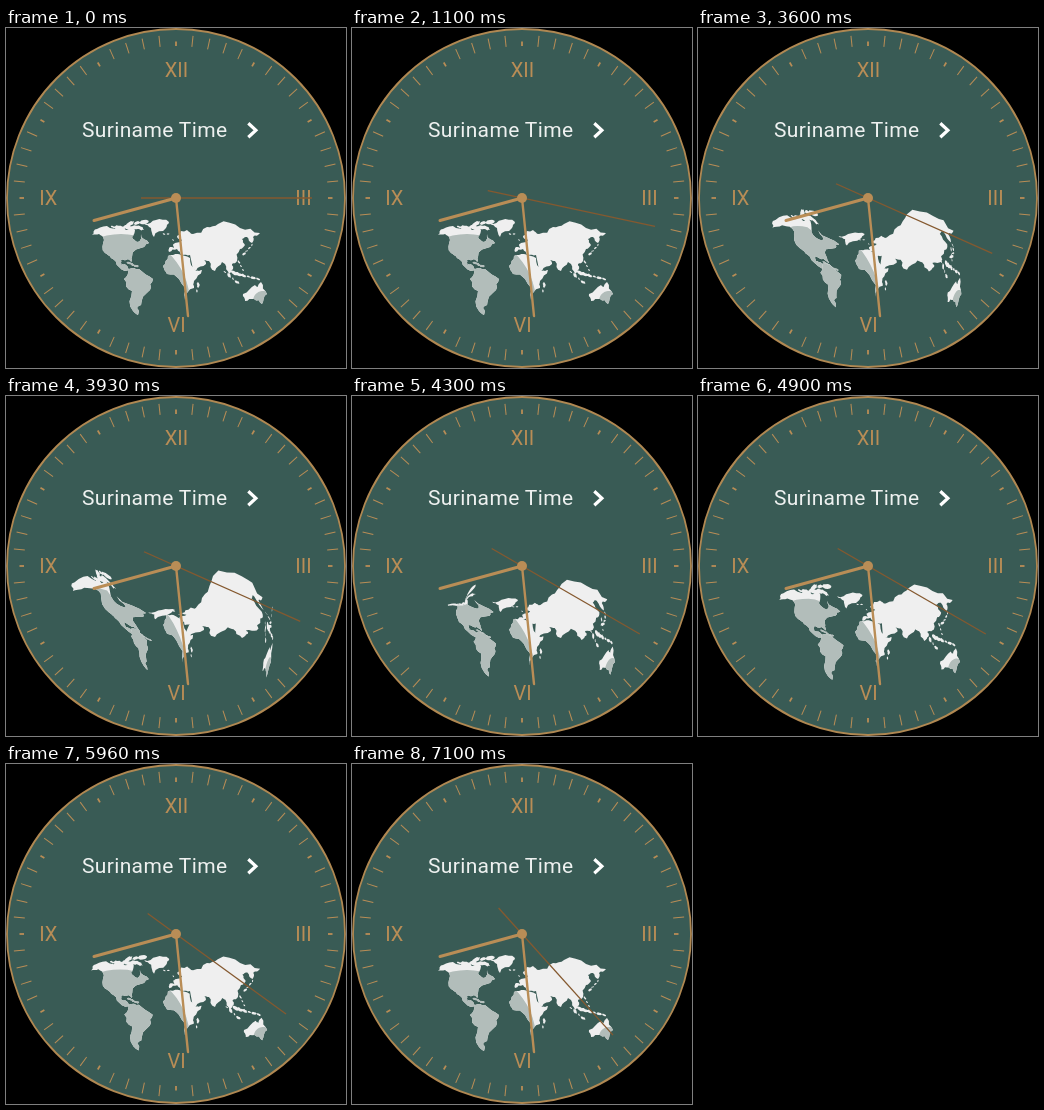
Recreate the animation shown at these times as an HTML page. Size 340 by 340 pixels, loop 8000 ms.

```html
<!DOCTYPE html>
<html lang="en">
<head>
<meta charset="utf-8">
<title>World clock</title>
<style>
html, body { margin: 0; width: 100%; height: 100%; overflow: hidden; background: #000; }
svg { display: block; width: 100vw; height: 100vh; font-family: Roboto, sans-serif; }
</style>
</head>
<body>
<svg viewBox="0 0 340 340">
  <circle cx="170" cy="170" r="169" fill="#395b55" stroke="#b08852" stroke-width="1.8"/>
  <g id="ticks" stroke="#b98d56"></g>
  <g fill="#b98d56" font-size="20" text-anchor="middle">
    <text x="170.5" y="48.5">XII</text>
    <text x="297.5" y="176.5">III</text>
    <text x="42.3" y="176.5">IX</text>
  </g>
  <text x="76" y="109.4" font-size="21" letter-spacing=".35" fill="#eef1f0">Suriname Time</text>
  <path d="M242.3 95.2l7.6 7-7.6 7" fill="none" stroke="#fff" stroke-width="3.2"/>
  <g id="map"></g>
  <text x="170.5" y="303.5" font-size="20" text-anchor="middle" fill="#b98d56">VI</text>
  <path id="second" d="M135 170H306" stroke="#85592f" stroke-width="1.3"/>
  <g stroke="#b98d56" stroke-linecap="round">
    <path d="M170 170L88 192.5" stroke-width="3"/>
    <path d="M170 170L182 288" stroke-width="2.4"/>
  </g>
  <circle cx="170" cy="170" r="5" fill="#b98d56"/>
</svg>
<script>
const $ = id => document.getElementById(id);
const points = s => s.trim().split(/\s+/).map(p => p.split(',').map(Number));
const clamp = v => Math.min(1, Math.max(0, v));
const smooth = v => (v = clamp(v)) * v * (3 - 2 * v);
const mix = (a, b, k) => a + (b - a) * k;

let seed = 7;
const random = () => (seed = seed * 16807 % 2147483647) / 2147483647;

// Roughen an outline by pushing the midpoint of every edge sideways
function coast(pts, depth = 2) {
  if (!depth) return pts;
  return coast(pts.flatMap(([x, y], i) => {
    const [u, v] = pts[(i + 1) % pts.length], r = (random() - .5) * .4;
    return [[x, y], [(x + u) / 2 + (v - y) * r, (y + v) / 2 - (u - x) * r]];
  }), depth - 1);
}

// A row of small islands from one point to another
function islands(x, y, u, v, count, size) {
  const angle = Math.atan2(v - y, u - x);
  return Array.from({ length: count }, (_, i) => {
    const k = i / (count - 1), s = size * (.6 + random() * .7), turn = angle + random() - .5;
    return coast([0, 1, 2, 3, 4, 5].map(n => {
      const a = n * Math.PI / 3, dx = Math.cos(a) * s, dy = Math.sin(a) * s * .45;
      return [mix(x, u, k) + dx * Math.cos(turn) - dy * Math.sin(turn),
              mix(y, v, k) + dx * Math.sin(turn) + dy * Math.cos(turn)];
    }), 1);
  });
}

const circle = (x, y, r) => Array.from({ length: 60 }, (_, i) =>
  [x + r * Math.cos(i * Math.PI / 30), y + r * Math.sin(i * Math.PI / 30)]);
const night = [circle(115, 275, 69), circle(257, 273, 10)];

// Each land: outline, islands, anchors on the world map and on the camel
const lands = [
  { // North America: head and neck
    shape: `86,207 91,201 104,200 120,202 129,202 126,209 132,214 135,206 143,215 138,219 126,229
      125,234 122,231 115,232 115,237 120,237 126,243 113,239 105,230 99,225 98,212 93,206`,
    isles: [[107, 199, 134, 200, 6, 4], [124, 196, 138, 194, 3, 4], [123, 235, 130, 238, 3, 2]],
    from: '86,207 104,200 128,203 97,211 131,208 99,222 143,215 113,238 126,230',
    to: '67,195 86,183 102,189 93,196 107,203 101,213 140,217 118,231 132,232'
  },
  { // South America: front leg
    shape: '123,241 133,241 147,251 144,262 136,272 131,280 132,287 127,283 126,263 118,251',
    from: '119,248 147,252 131,287', to: '125,238 141,245 141,274'
  },
  { // Greenland: back
    shape: '138,195 150,192 163,194 160,200 148,209 145,200',
    from: '138,196 162,194 149,207', to: '142,217 168,214 151,222'
  },
  { // Europe and Asia: hump
    shape: `163,224 163,220 168,220 167,217 176,212 171,208 181,202 187,206 201,199 212,196 234,200
      254,205 247,209 246,215 241,209 236,211 239,217 234,221 231,233 226,236 227,241 223,246 219,236
      216,234 209,243 203,233 198,232 200,236 190,243 184,227 176,227 171,221`,
    isles: [[167, 212, 168, 217, 2, 2], [238, 226, 246, 217, 4, 2.2], [158, 206, 162, 206, 2, 1.5]],
    from: '163,222 180,202 201,199 212,196 236,200 254,206 236,225 223,246 209,243 190,242',
    to: '170,226 184,212 199,198 207,180 238,180 257,203 260,229 236,242 209,241 183,240'
  },
  { // Africa: second leg
    shape: '162,228 172,226 184,230 190,243 196,242 188,253 188,260 179,272 173,251 161,246 157,238',
    isles: [[192, 257, 191, 263, 2, 2.5]],
    from: '158,238 179,271 196,241', to: '158,229 177,266 187,238'
  },
  { // Australia: hind leg
    shape: '237,266 249,257 252,259 255,254 261,266 256,276 248,271 239,273',
    isles: [[219, 244, 231, 254, 4, 2.5], [228, 245, 252, 251, 6, 3], [233, 234, 237, 242, 3, 2]],
    from: '238,270 255,256 257,275', to: '257,270 266,250 261,280'
  }
];

// Moving least squares: local affine map that carries the anchors across
function warp([x, y], from, to) {
  const w = from.map(([a, b]) => ((a - x) ** 2 + (b - y) ** 2 + .5) ** -1.5);
  const total = w.reduce((a, b) => a + b);
  const mean = (set, k) => set.reduce((s, p, i) => s + w[i] * p[k], 0) / total;
  const px = mean(from, 0), py = mean(from, 1), qx = mean(to, 0), qy = mean(to, 1);
  let xx = 0, xy = 0, yy = 0, xu = 0, yu = 0, xv = 0, yv = 0;
  from.forEach((p, i) => {
    const a = p[0] - px, b = p[1] - py, u = to[i][0] - qx, v = to[i][1] - qy, k = w[i];
    xx += k * a * a; xy += k * a * b; yy += k * b * b;
    xu += k * a * u; yu += k * b * u; xv += k * a * v; yv += k * b * v;
  });
  const det = xx * yy - xy * xy, dx = x - px, dy = y - py;
  const g = (dx * yy - dy * xy) / det, h = (dy * xx - dx * xy) / det;
  return [qx + g * xu + h * yu, qy + g * xv + h * yv];
}

lands.forEach((land, i) => {
  const from = points(land.from), to = points(land.to);
  const pair = shapes => shapes.map(s => s.map(p => [p, warp(p, from, to)]));
  const isles = (land.isles || []).flatMap(row => islands(...row));
  land.day = pair([coast(points(land.shape)), ...isles]);
  land.night = pair(night);
  $('map').innerHTML += `<clipPath id="clip${i}"><path id="edge${i}"/></clipPath>
    <path id="day${i}" fill="#efefef"/>
    <path id="night${i}" fill="#b2bdba" clip-path="url(#clip${i})"/>`;
});

// time, share of camel in the map
const keys = [[0, 0], [3200, 0], [3900, 1], [4030, 1], [4300, .5], [4900, .25], [6360, 0], [8000, 0]];

function outline(shapes, camel, fold) {
  const place = ([p, q]) => {
    let x = mix(p[0], q[0], camel), y = mix(p[1], q[1], camel);
    const pull = fold * clamp((125 - x) / 15) * clamp((225 - y) / 10);
    x = mix(x, 115, pull * .5);
    y = mix(y, 212, pull * .8);
    return x.toFixed(2) + ' ' + y.toFixed(2);
  };
  return shapes.map(s => 'M' + s.map(place).join('L') + 'Z').join('');
}

let shown;
function drawMap(t) {
  const i = keys.findIndex(k => t < k[0]), [start, a] = keys[i - 1], [end, b] = keys[i];
  const camel = mix(a, b, smooth((t - start) / (end - start)));
  const fold = smooth((t - 4030) / 270) * (1 - smooth((t - 4300) / 400)); // head sinks to the shoulder
  if (shown === camel + ',' + fold) return;
  shown = camel + ',' + fold;
  lands.forEach((land, n) => {
    const day = outline(land.day, camel, fold);
    $('day' + n).setAttribute('d', day);
    $('edge' + n).setAttribute('d', day);
    $('night' + n).setAttribute('d', outline(land.night, camel, fold));
  });
}

for (let i = 0; i < 60; i++) {
  const hour = i % 5 === 0;
  $('ticks').innerHTML += `<path d="M170 ${hour ? 13.5 : 7}V18" stroke-width="${hour ? 1.8 : 1}"
    transform="rotate(${i * 6} 170 170)"/>`;
}

function frame(now) {
  const t = now % 8000;
  $('second').setAttribute('transform', `rotate(${6 * Math.floor((t + 940) / 1000)} 170 170)`);
  drawMap(t);
  requestAnimationFrame(frame);
}
frame(0);
</script>
</body>
</html>
```
